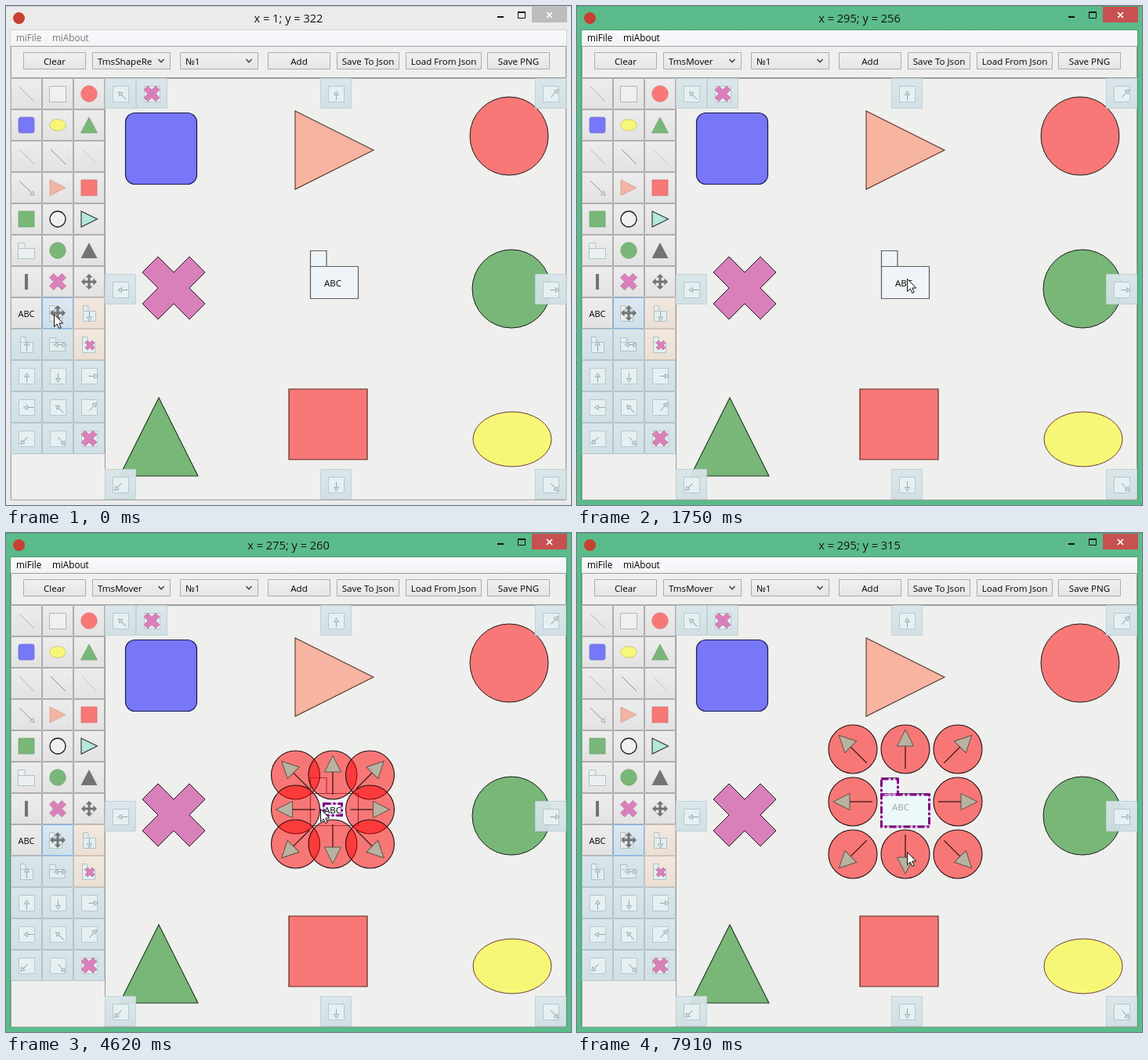
Write an HTML page with a canvas that moves like this. It is 721 px wide and 637 px high and loops after 8 s.

```html
<!DOCTYPE html>
<html lang="en">
<head>
<meta charset="utf-8">
<title>Shape editor</title>
<style>
html, body { margin: 0; width: 100%; height: 100%; overflow: hidden; background: #efefee; }
canvas { display: block; width: 721px; height: 637px; }
</style>
</head>
<body>
<canvas id="stage" width="721" height="637"></canvas>
<script>
const g = document.getElementById('stage').getContext('2d');
const LOOP = 8000, STEP = 70, TAU = Math.PI * 2;
const FONT = '"Open Sans", "Noto Sans", sans-serif';
const ACTIVATE = 70, PICK_TEXT = 2240, DROP_TEXT = 5040, PICK_FOLDER = 5810, NUDGE = 7910;
const INK = '#1c1c1c', RED = '#f77877', GREEN = '#79b779', PINK = '#d980ba', DARK = '#737373';

// pointer path: time, x, y
const PATH = [
  [0, 61, 393], [560, 61, 393], [630, 62, 393], [980, 232, 374], [1260, 415, 348], [1330, 425, 346],
  [1400, 425, 346], [1470, 424, 347], [1610, 422, 348], [1680, 422, 348], [1750, 421, 348],
  [3220, 421, 348], [3290, 424, 352], [3360, 430, 362], [3570, 235, 424], [3710, 360, 386],
  [3780, 388, 376], [3850, 388, 376], [4060, 409, 366], [4270, 409, 366], [4620, 401, 352],
  [4760, 401, 352], [5040, 413, 349], [5390, 413, 349], [5810, 405, 364], [7420, 405, 364],
  [7700, 421, 407], [8000, 421, 407]
];

function pointerAt(t) {
  const i = Math.max(1, PATH.findIndex(k => k[0] >= t));
  const [t0, x0, y0] = PATH[i - 1], [t1, x1, y1] = PATH[i];
  const u = (t - t0) / (t1 - t0);
  return [Math.round(x0 + (x1 - x0) * u), Math.round(y0 + (y1 - y0) * u)];
}

function paint(fill, stroke, width = 1) {
  if (fill) { g.fillStyle = fill; g.fill(); }
  if (stroke) { g.strokeStyle = stroke; g.lineWidth = width; g.stroke(); }
}
function box(x, y, w, h, fill, stroke, width, radius = 0) {
  g.beginPath();
  if (radius) g.roundRect(x, y, w, h, radius); else g.rect(x, y, w, h);
  paint(fill, stroke, width);
}
function oval(x, y, rx, ry, fill, stroke, width) {
  g.beginPath();
  g.ellipse(x, y, rx, ry, 0, 0, TAU);
  paint(fill, stroke, width);
}
function poly(points, fill, stroke, width) {
  g.beginPath();
  points.forEach(([x, y]) => g.lineTo(x, y));
  g.closePath();
  paint(fill, stroke, width);
}
function line(x0, y0, x1, y1, color, width = 1) {
  g.beginPath();
  g.moveTo(x0, y0);
  g.lineTo(x1, y1);
  paint(null, color, width);
}
function text(s, x, y, size, color = '#000', align = 'center') {
  g.font = size + 'px ' + FONT;
  g.textAlign = align;
  g.textBaseline = 'alphabetic';
  g.fillStyle = color;
  g.fillText(s, x, y);
}
function shade(y, h, top, bottom) {
  const s = g.createLinearGradient(0, y, 0, y + h);
  s.addColorStop(0, top);
  s.addColorStop(1, bottom);
  return s;
}
// runs draw() at x, y, turned by angle
function at(x, y, angle, draw) {
  g.save();
  g.translate(x, y);
  g.rotate(angle);
  draw();
  g.restore();
}

// half: half of the whole width
function saltire(x, y, half, fill, stroke) {
  const h = half / 2;
  const pts = [];
  for (let i = 0; i < 4; i++) {
    const c = Math.round(Math.cos(i * TAU / 4)), s = Math.round(Math.sin(i * TAU / 4));
    for (const [px, py] of [[-h, -half], [0, -h], [h, -half]])
      pts.push([x + px * c - py * s, y + px * s + py * c]);
    pts.pop();
    pts.push([x + h * c + half * s, y + h * s - half * c]);
  }
  poly(pts, fill, stroke);
}
function moveCross(x, y) {
  for (let i = 0; i < 4; i++) at(x, y, i * TAU / 4, () => {
    box(0, -1.5, 7, 3, DARK);
    poly([[10, 0], [5.5, -4.5], [5.5, 4.5]], DARK);
  });
}
function thinArrow(x0, y0, x1, y1, color = '#93a5a8') {
  const len = Math.hypot(x1 - x0, y1 - y0);
  at(x0, y0, Math.atan2(y1 - y0, x1 - x0), () => {
    line(0, 0, len - 5, 0, color);
    poly([[len, 0], [len - 5, -3], [len - 5, 3]], '#cfe3df', color, .8);
  });
}

const DIRS = {
  up: [0, 8, 0, -4], down: [0, -4, 0, 8], right: [-1, 0, 11, 0], left: [9, 0, -4, 0],
  ul: [7, 7, -3, -3], ur: [0, 4, 9, -6], dl: [1, -2, -8, 7], dr: [0, -2, 9, 8]
};
function dirIcon(x, y, dir) {
  box(x - 9.5, y - 9.5, 20, 20, '#e6f0f3', '#b9c8cd');
  if (dir === 'x') return saltire(x, y, 10, PINK, '#c38bad');
  const [a, b, c, d] = DIRS[dir];
  thinArrow(x + a + .5, y + b + .5, x + c + .5, y + d + .5);
}
function smallFolder(x, y, w = 16, h = 20, fill = '#e3eef0') {
  box(x + .5, y + .5, w * .4, h * .4, fill, '#b4c0c4');
  box(x + .5, y + h * .35 + .5, w, h * .65, fill, '#b4c0c4');
}

const ICONS = [
  (x, y) => line(x - 9, y - 9, x + 10, y + 10, '#b0b0b0'),
  (x, y) => box(x - 10.5, y - 9.5, 21, 20, '#f0f0f0', '#b4b4b4'),
  (x, y) => oval(x, y, 10.3, 10.3, RED, '#df7474', .7),
  (x, y) => box(x - 10, y - 10, 20, 20, '#7777f7', '#7373d5', .8, 2.5),
  (x, y) => oval(x, y, 10.3, 7.3, '#f7f777', '#c4bd78', .8),
  (x, y) => poly([[x, y - 10], [x + 10.5, y + 10], [x - 10.5, y + 10]], GREEN, '#6d9c6d', .7),
  (x, y) => line(x - 9, y - 9, x + 10, y + 10, '#b4b4b4'),
  (x, y) => line(x - 9, y - 9, x + 10, y + 10, '#8d8d8d'),
  (x, y) => line(x - 9, y - 9, x + 10, y + 10, '#c2c2c2'),
  (x, y) => thinArrow(x - 9, y - 9, x + 10, y + 10, '#9ea5a2'),
  (x, y) => poly([[x - 10, y - 10], [x + 10, y], [x - 10, y + 10]], '#f2b4a4', '#cf9f94', .8),
  (x, y) => box(x - 10, y - 10, 20, 20, RED, '#d27070', .8),
  (x, y) => box(x - 10, y - 10, 20, 20, GREEN, '#71a471', .8),
  (x, y) => oval(x, y, 10, 10, '#f0f0f0', '#222', 1.3),
  (x, y) => poly([[x - 10, y - 10], [x + 10.5, y], [x - 10, y + 10]], '#b4e8dc', '#333', 1.1),
  (x, y) => smallFolder(x - 11, y - 10, 21, 20, '#eaf0f2'),
  (x, y) => oval(x, y, 10.3, 10.3, GREEN, '#70a070', .7),
  (x, y) => poly([[x, y - 10], [x + 10.5, y + 10], [x - 10.5, y + 10]], DARK),
  (x, y) => box(x - 2, y - 10, 4, 20, DARK),
  (x, y) => saltire(x, y, 10.5, PINK, '#bf86a9'),
  (x, y) => moveCross(x, y),
  (x, y) => text('ABC', x, y + 5, 11),
  (x, y) => { smallFolder(x - 11, y - 10); moveCross(x, y); },
  (x, y) => { smallFolder(x - 8, y - 10); thinArrow(x + .5, y - 2, x + .5, y + 10); },
  (x, y) => { smallFolder(x - 8, y - 10); thinArrow(x + .5, y + 9, x + .5, y - 4); },
  (x, y) => {
    smallFolder(x - 11, y - 9, 20, 17);
    thinArrow(x + 3, y + .5, x - 5, y + .5);
    thinArrow(x + 3, y + .5, x + 11, y + .5);
  },
  (x, y) => { smallFolder(x - 9, y - 10); saltire(x + 1, y + 1, 6, PINK, '#bd82a5'); },
  ...['up', 'down', 'right', 'left', 'ul', 'ur', 'dl', 'dr', 'x'].map(d => (x, y) => dirIcon(x, y, d))
];

function palette() {
  ICONS.forEach((icon, i) => {
    const x = 6 + i % 3 * 40, y = 92 + Math.floor(i / 3) * 40;
    let fill = shade(y, 40, '#ededed', '#e2e2e2'), edge = '#adadad';
    if (i > 21) { fill = shade(y, 40, '#d9e6eb', '#d0e0e5'); edge = '#b5c4ca'; }
    if (i === 23 || i === 26) { fill = shade(y, 40, '#f2e8df', '#ebdfd4'); edge = '#cfc2b6'; }
    if (i === 22) { fill = shade(y, 40, '#dce8f2', '#cfdfe9'); edge = '#7eb4ea'; }
    box(x + .5, y + .5, 39, 39, fill, edge);
    icon(x + 20, y + 20);
  });
}

const EDGES = [[126, 92, 'ul'], [166, 92, 'x'], [401, 92, 'up'], [675, 92, 'ur'], [126, 342, 'left'],
  [675, 342, 'right'], [126, 591, 'dl'], [401, 591, 'down'], [675, 591, 'dr']];
function edgeButtons() {
  for (const [x, y, dir] of EDGES) {
    g.globalAlpha = .93;
    box(x + .5, y + .5, 39, 38, shade(y, 39, '#d9e6ea', '#cfdfe4'), '#c0d0d6');
    g.globalAlpha = 1;
    dirIcon(x + 20, y + 20, dir);
  }
}

function chrome(active, title) {
  const frame = active ? '#5bbb8a' : '#ebebeb';
  box(0, 0, 721, 637, frame);
  box(0, 0, 721, 1, active ? '#4fa578' : '#c8c8c8');
  oval(16.5, 15.5, 7.5, 7.5, '#c8402f');
  text(title, 360.5, 21, 14.6, '#151515');
  box(627, 13, 8, 2, '#111');
  box(653.5, 7.5, 9, 8, null, '#111');
  box(653, 7, 10, 2, '#111');
  box(671, 1, 45, 20, active ? '#c75050' : '#bcbcbc');
  line(690, 8, 697, 15, '#fff', 1.7);
  line(697, 8, 690, 15, '#fff', 1.7);

  box(5.5, 30.5, 710, 600, '#efefee', active ? '#4c9a73' : '#d2d2d2');
  box(6, 31, 709, 20, shade(31, 20, '#f8f9fb', '#f2f3f6'));
  const menu = active ? '#000' : '#777';
  text('miFile', 13, 45, 11.7, menu, 'left');
  text('miAbout', 59, 45, 11.7, menu, 'left');
  box(6.5, 51.5, 708, 40, '#efefed', '#9d9d9d');

  const buttons = [['Clear', 22, 80], ['', 110, 100], ['', 222, 100], ['Add', 334, 80],
    ['Save To Json', 422, 80], ['Load From Json', 510, 97], ['Save PNG', 614, 80]];
  for (const [label, x, w] of buttons) {
    box(x + .5, 59.5, w - 1, 21, shade(59, 22, '#f1f1f1', '#e5e5e5'), '#acacac');
    text(label, x + w / 2, 75, 11.6);
  }
  text(active ? 'TmsMover' : 'TmsShapeRe', 117, 75, 11.6, '#000', 'left');
  text('№1', 229, 75, 11.6, '#000', 'left');
  for (const x of [198, 310]) {
    line(x - 3.5, 68, x + .3, 72, '#444', 1.6);
    line(x - .3, 72, x + 3.5, 68, '#444', 1.6);
  }
  box(6.5, 91.5, 120, 539, null, '#a6a6a6');
  box(126.5, 92.5, 588, 538, null, '#9d9d9d');
}

function drawing() {
  box(152.5, 136.5, 91, 91, '#7777f7', '#1b1b55', 1.2, 12);
  poly([[369, 134], [469, 184], [369, 234]], '#f7b4a0', '#54392c', 1.1);
  oval(642, 166, 50, 50, RED, INK);
  saltire(214, 360, 40, PINK, INK);
  oval(645, 361, 50, 50, GREEN, INK);
  poly([[195, 500], [245, 600], [145, 600]], GREEN, '#1f3a1f', 1.1);
  box(361, 489, 100, 90, RED, '#5c2a22', 1.2);
  oval(646, 553, 50, 35, '#f7f777', '#6b3f35');
}

function folder() {
  box(388.5, 312.5, 20.5, 20, '#eff4f8', '#5a5e60', 1.2);
  box(388.5, 332.5, 61, 41, '#eff4f8', '#5a5e60', 1.2);
}
function dashBox(x, y, w, h, fill) {
  box(x, y, w, h, fill, '#d3a4d9', 1.5);
  g.setLineDash([9, 3, 3, 3]);
  box(x, y, w, h, null, '#800080', 3);
  g.setLineDash([]);
}
function pickedFolder(dy) {
  dashBox(388.5, 313 + dy, 21, 20, 'rgba(237,252,252,.6)');
  dashBox(388.5, 333 + dy, 61, 41, 'rgba(237,252,252,.6)');
  line(392, 333 + dy, 407, 333 + dy, '#c983d2', 2);
}
function mover(cx, cy, dx, dy) {
  for (let j = -1; j <= 1; j++) for (let i = -1; i <= 1; i++) {
    if (!i && !j) continue;
    at(cx + i * dx, cy + j * dy, Math.atan2(j, i), () => {
      oval(0, 0, 31, 31, 'rgba(255,0,0,.5)', '#241010', 1.1);
      line(-25, 0, 4, 0, '#2a1010', 1.2);
      poly([[25, 0], [4, -10.5], [4, 10.5]], '#b8b2a0', '#5e5148');
    });
  }
}
function pointer(x, y) {
  at(x, y, 0, () => poly([[.5, .5], [.5, 16.5], [4.2, 13], [6.8, 18.5], [9.2, 17.5], [6.8, 12], [11.8, 12]],
    '#fff', '#111'));
}

function render(ms) {
  const t = Math.floor(ms / STEP) * STEP;
  const [px, py] = pointerAt(t);
  const textPicked = t >= PICK_TEXT && t < DROP_TEXT;
  const title = px < 127 ? 'x = 1; y = 322' : `x = ${px - 126}; y = ${py - 92}`;

  chrome(t >= ACTIVATE, title);
  palette();
  drawing();
  folder();
  if (textPicked) {
    mover(417, 353, 47.5, 44);
    dashBox(405.5, 345.5, 23, 15, '#f3f5fa');
  }
  if (t < DROP_TEXT) text('ABC', 417, 358, 11.5);
  else text('ABC', 413, 354, 11.5, '#222');
  if (t >= PICK_FOLDER) {
    pickedFolder(t >= NUDGE ? 1 : 0);
    mover(419, 343, 67, 67);
  }
  edgeButtons();
  pointer(px, py);
}

function tick() {
  render(performance.now() % LOOP);
  requestAnimationFrame(tick);
}
tick();
</script>
</body>
</html>
```
